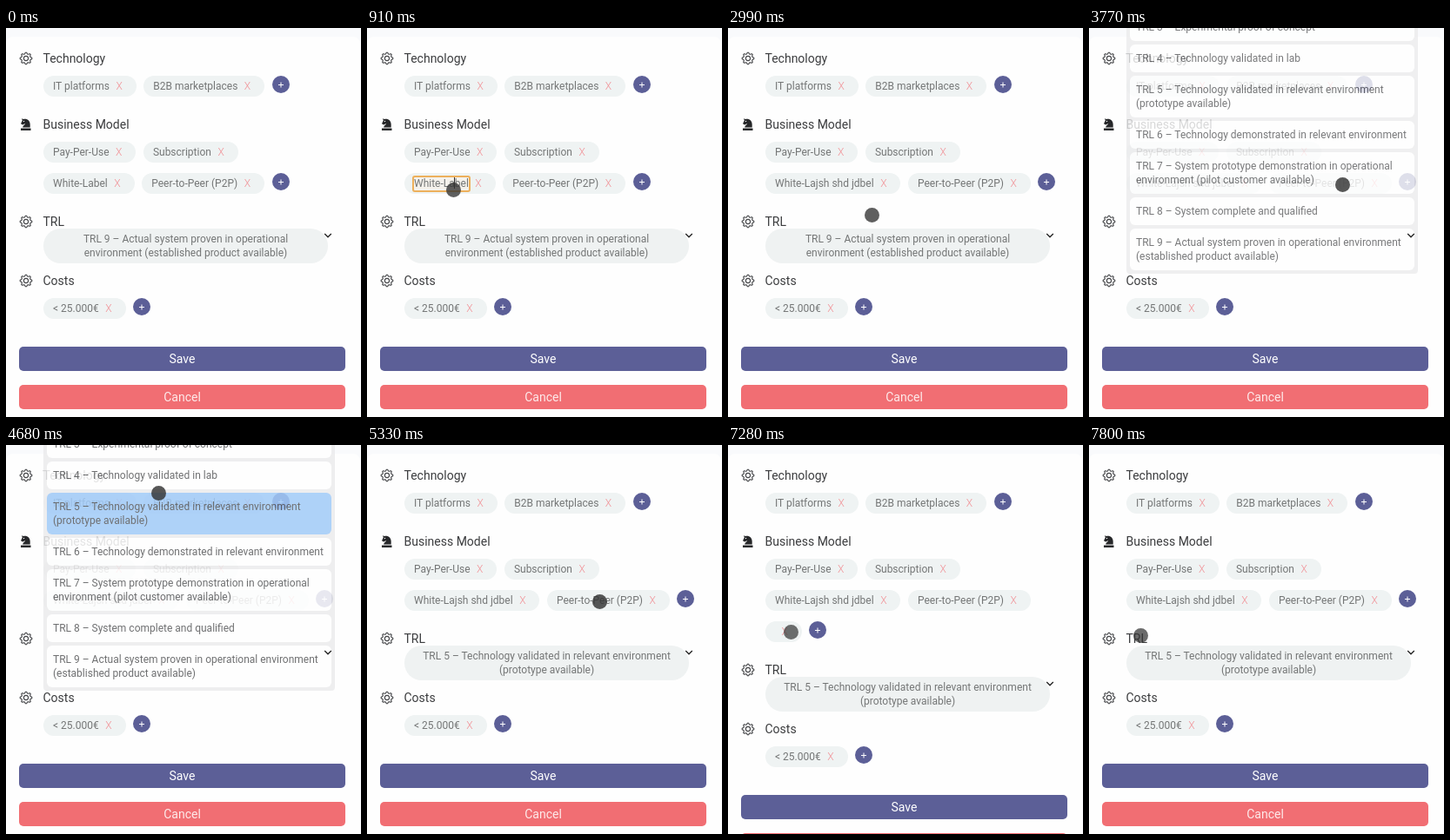
Animation, 408 px wide and 448 px high, one loop 8000 ms. Source, as an HTML page:

```html
<!DOCTYPE html>
<html lang="en">
<head>
<meta charset="utf-8">
<title>Profile editor</title>
<style>
  html, body { margin: 0; width: 100%; height: 100%; overflow: hidden; background: #f9fafc; }
  #stage { position: relative; width: 408px; height: 448px; overflow: hidden; font: 12px/24px Roboto, sans-serif; color: #747676; }
  #stage > *, #lower > * { position: absolute; white-space: nowrap; }
  .card { left: 0; top: 10px; width: 407px; height: 450px; border-radius: 8px; background: #fefefe; }
  h2 { left: 42.5px; margin: -10px 0 0; font: 14px/20px Roboto, sans-serif; color: #3c3d3f; }
  .icon { left: 15px; width: 16px; height: 16px; margin-top: -8px; }
  .row { left: 43px; display: flex; gap: 8.5px; align-items: center; height: 24px; }
  .chip { display: flex; align-items: center; height: 24px; padding: 0 16px 0 11px; border-radius: 12px; background: #eff3f3; }
  .chip i { margin-left: 7.5px; font-style: normal; font-weight: 300; color: #f18f94; }
  .label { line-height: 15px; white-space: pre; }
  .label.editing { outline: 2px solid #edb05c; border-radius: 1px; background: #f5f2ec; }
  .caret { display: inline-block; width: 1px; height: 13px; margin: 0 -.5px; vertical-align: -2px; background: #333; }
  .plus { position: relative; top: -2px; width: 20px; height: 20px; border-radius: 50%; background: #5c5f97; }
  .plus::before, .plus::after { content: ""; position: absolute; left: 7px; top: 9.5px; width: 6px; height: 1px; background: #fff; }
  .plus::after { transform: rotate(90deg); }
  #lower { left: 0; top: 0; width: 408px; height: 500px; }
  #select { left: 43px; top: 231px; width: 327px; height: 32px; padding: 4px 0; border-radius: 20px; background: #eff2f2; line-height: 16px; text-align: center; }
  .button { left: 15px; width: 375px; height: 28px; border-radius: 5px; text-align: center; font-size: 14px; line-height: 28px; color: #fff; }
  #menu { left: 43px; bottom: 165px; width: 327px; padding: 4px; border-radius: 4px; background: #ececed; line-height: 16px; color: #58595b; }
  #menu div { margin-top: 4px; padding: 8px 7px; border-radius: 6px; background: #fff; }
  #menu .active { background: #a2cbf8; }
  #chevron { left: 365px; top: 235px; width: 10px; height: 8px; }
  #pointer { left: -8.5px; top: -8.5px; width: 17px; height: 17px; border-radius: 50%; background: #323232; }
</style>
</head>
<body>
<div id="stage">
  <div class="card"></div>
  <svg class="icon gear" style="top:35px"></svg>
  <h2 style="top:35px">Technology</h2>
  <div class="row" style="top:55px" data-chips="IT platforms|B2B marketplaces"><b class="plus"></b></div>

  <svg class="icon" style="top:111px" viewBox="0 0 16 16" fill="#262729">
    <path d="M3 1.2 5 2C9.5 1 12.7 4 12.7 8V11.5H4.2C4.2 9.5 7 8.6 7.2 7.1L4.2 8.4 2 7.2 3.8 3.6ZM2 12.5H13.5V15H2Z"/>
    <circle cx="5.5" cy="4.4" r=".7" fill="#fff"/>
  </svg>
  <h2 style="top:111px">Business Model</h2>
  <div class="row" style="top:131px" data-chips="Pay-Per-Use|Subscription"></div>
  <div class="row" style="top:167px" data-chips="White-Label|Peer-to-Peer (P2P)"><b class="plus" id="add"></b></div>
  <div class="row" style="top:203px" data-chips="" id="extra"><b class="plus" id="moved"></b></div>

  <div id="lower">
    <svg class="icon gear" style="top:223px"></svg>
    <h2 style="top:223px" id="trl">TRL</h2>
    <div id="select"></div>
    <svg class="icon gear" style="top:291px"></svg>
    <h2 style="top:291px">Costs</h2>
    <div class="row" style="top:311px" data-chips="&lt; 25.000€"><b class="plus"></b></div>
    <div class="button" style="top:367px;background:#5c5f97">Save</div>
    <div class="button" style="top:411px;background:#f16e73;color:#fdeaea">Cancel</div>
  </div>

  <div id="menu">
    <div>TRL 3 – Experimental proof of concept</div>
    <div>TRL 4 – Technology validated in lab</div>
    <div id="choice">TRL 5 – Technology validated in relevant environment<br>(prototype available)</div>
    <div>TRL 6 – Technology demonstrated in relevant environment</div>
    <div>TRL 7 – System prototype demonstration in operational<br>environment (pilot customer available)</div>
    <div>TRL 8 – System complete and qualified</div>
    <div>TRL 9 – Actual system proven in operational environment<br>(established product available)</div>
  </div>
  <svg id="chevron" viewBox="0 0 10 8" fill="none" stroke="#222" stroke-width="1.3"><path d="M1.2 2 5 5.8 8.8 2"/></svg>
  <div id="pointer"></div>
</div>
<script>
const $ = id => document.getElementById(id);
const LOOP = 8000, STEP = 130;

for (const row of document.querySelectorAll('[data-chips]')) {
  const chips = row.dataset.chips.split('|').map(text => {
    const chip = document.createElement('div');
    chip.className = 'chip';
    chip.innerHTML = '<span class="label"></span><i>X</i>';
    chip.firstChild.textContent = text;
    return chip;
  });
  row.prepend(...chips);
}

const teeth = Array.from({ length: 32 }, (_, i) => {
  const angle = (i - .5) * Math.PI / 16, r = i % 4 < 2 ? 6.8 : 5.3;
  return [8 + r * Math.sin(angle), 8 - r * Math.cos(angle)].map(n => n.toFixed(2));
}).join(' ');
for (const gear of document.querySelectorAll('.gear')) {
  gear.setAttribute('viewBox', '0 0 16 16');
  gear.innerHTML = `<g fill="none" stroke="#444548" stroke-width="1.1" stroke-linejoin="round">
    <polygon points="${teeth}"/><circle cx="8" cy="8" r="2.6"/></g>`;
}

// time, x, y, opacity
const path = [
  [260, 150, 205, .6], [650, 99, 186, .78], [2340, 99, 186, .78], [2730, 150, 210, .78],
  [2990, 165, 215, .78], [3380, 288, 250, .78], [3510, 290, 248, .78], [3770, 291, 180, .82],
  [4290, 175, 60, .82], [4550, 175, 58, .82], [4680, 175, 55, .82], [4810, 177, 62, .82],
  [5330, 267, 180, .82], [6110, 371, 184, .7], [6500, 371, 184, .56], [6630, 360, 186, .6],
  [7280, 72, 215, .7], [7540, 59, 219, .72], [LOOP, 59, 219, .72]
];
// time, value; each value holds until the next
const typed = [[0, ''], [1430, 'jsh'], [1560, 'jsh s'], [1690, 'jsh shd'], [1820, 'jsh shd jd']];
const menuOpacity = [[0, 0], [3640, .5], [3770, .8], [3900, .86], [4810, .4], [4940, 0]];

const held = (keys, t) => keys.findLast(key => key[0] <= t)[1];
const between = (t, from, to) => t >= from && t < to;

function pointerAt(t) {
  const i = path.findIndex(key => key[0] > t);
  const a = path[i - 1], b = path[i];
  const p = (t - a[0]) / (b[0] - a[0]);
  return a.map((v, k) => v + (b[k] - v) * p);
}

const name = document.querySelectorAll('.label')[4];
let shown = -1;

function draw(t) {
  const editing = between(t, 910, 2600), added = between(t, 6500, 7800);
  name.className = editing ? 'label editing' : 'label';
  name.innerHTML = 'White-La' + held(typed, t) + (editing ? '<span class="caret"></span>' : '') + 'bel';

  $('extra').style.visibility = added ? 'visible' : 'hidden';
  $('add').style.visibility = added ? 'hidden' : 'visible';
  $('add').style.background = between(t, 5980, 6500) ? '#3f86b8' : '';
  $('moved').style.background = between(t, 6500, 6630) ? '#4086b8' : '';
  $('lower').style.top = $('chevron').style.marginTop = added ? '36px' : 0;

  const opacity = held(menuOpacity, t);
  $('menu').style.opacity = opacity;
  $('choice').className = between(t, 4550, 4940) ? 'active' : '';
  $('trl').style.visibility = $('select').style.visibility = opacity > .6 ? 'hidden' : 'visible';
  $('select').innerHTML = t >= 4810
    ? $('choice').innerHTML
    : 'TRL 9 – Actual system proven in operational<br>environment (established product available)';

  const pointer = $('pointer').style;
  if (t < 260) return void (pointer.opacity = 0);
  const [, x, y, alpha] = pointerAt(t);
  pointer.opacity = alpha;
  pointer.transform = `translate(${x}px, ${y}px)`;
}

const start = performance.now();
function tick() {
  const t = Math.floor((performance.now() - start) % LOOP / STEP) * STEP;
  if (t !== shown) draw(shown = t);
  requestAnimationFrame(tick);
}
tick();
</script>
</body>
</html>
```
